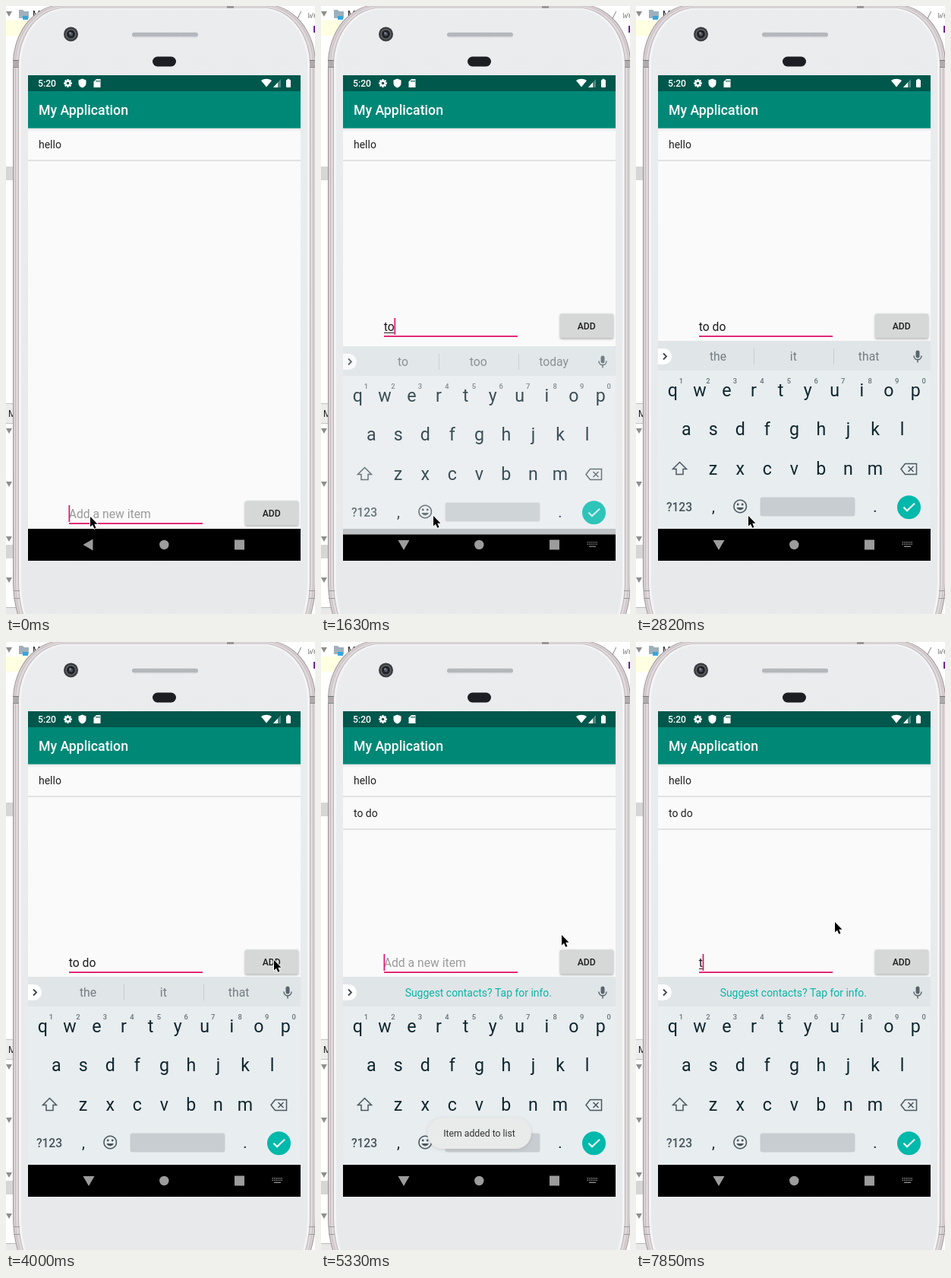
Recreate the animation shown at these times as an HTML page with a canvas. Size 407 by 799 pixels, loop 8000 ms.

```html
<!DOCTYPE html>
<html lang="en">
<head>
<meta charset="utf-8">
<title>To-do list app</title>
<style>
html, body { margin: 0; width: 100%; height: 100%; overflow: hidden; background: #fff; }
canvas { display: block; }
</style>
</head>
<body>
<canvas id="stage" width="407" height="799"></canvas>
<script>
const ctx = document.getElementById('stage').getContext('2d');
const LOOP = 8000, STEPS = 54;
const PINK = '#e0156b', KEY = '#10262e', ICON = '#58656b', TEAL = '#00b9aa';

// [step, x, y]: the pointer holds each place until the next step
const POINTER = [
  [0, 111, 671], [4, 117, 671], [5, 138, 670], [6, 148, 670],
  [23, 162, 653], [24, 215, 580], [25, 290, 490], [26, 345, 430], [27, 353, 418],
  [31, 349, 414], [32, 335, 403], [33, 324, 395], [35, 320, 389], [36, 317, 385],
  [38, 300, 364], [39, 235, 402], [40, 191, 451],
  [45, 200, 425], [46, 222, 375], [47, 238, 345], [48, 252, 356], [49, 262, 368]
];
const BLINKS = [1, 4, 8, 11, 19, 22, 26, 29, 32, 35, 39, 42, 45, 49, 52, 53];
const TYPED = [[0, ''], [11, 'to'], [13, 'to '], [15, 'to do'], [16, 'to do '], [29, ''], [53, 't']];
const HINTS = [
  [0, 'to too today'], [13, 'the be do'], [15, "do don't download"], [16, 'the it that'], [30, '']
];
const TOAST = [[0, 0], [30, .25], [31, .65], [32, 1], [42, .95], [43, .8], [44, .5], [45, .2], [46, 0]];
const BUTTON = [[0, '#d6d7d7'], [28, '#c9caca'], [29, '#c2c3c3'], [30, '#cccdcd'], [31, '#d6d7d7']];

const at = (list, n) => list.filter(e => e[0] <= n).pop();

function rect(x, y, w, h, color) {
  ctx.fillStyle = color;
  ctx.fillRect(x, y, w, h);
}
function pill(x, y, w, h, r, color) {
  ctx.fillStyle = color;
  ctx.beginPath();
  ctx.roundRect(x, y, w, h, r);
  ctx.fill();
}
function disc(x, y, r, color) {
  ctx.fillStyle = color;
  ctx.beginPath();
  ctx.arc(x, y, r, 0, 7);
  ctx.fill();
}
function fillPath(d, x, y, color) {
  ctx.save();
  ctx.translate(x, y);
  ctx.fillStyle = color;
  ctx.fill(new Path2D(d));
  ctx.restore();
}
function line(d, x, y, color, width) {
  ctx.save();
  ctx.translate(x, y);
  ctx.strokeStyle = color;
  ctx.lineWidth = width;
  ctx.stroke(new Path2D(d));
  ctx.restore();
}
function text(s, x, y, size, color, align = 'left', weight = 400) {
  ctx.font = `${weight} ${size}px Roboto, sans-serif`;
  ctx.textAlign = align;
  ctx.fillStyle = color;
  ctx.fillText(s, x, y);
}

function desktop() {
  rect(0, 0, 407, 799, '#fff');
  rect(0, 19, 34, 20, '#ffffe1');
  rect(0, 211, 9, 18, '#d6d6d6');
  rect(0, 523, 9, 25, '#ececec');
  rect(0, 522, 9, 1, '#c4c4c4');
  rect(0, 548, 9, 1, '#c4c4c4');
  rect(0, 708, 9, 18, '#d6d6d6');
  rect(0, 790, 20, 9, '#e8e8e8');
  rect(0, 790, 20, 1, '#bbb');
  for (const y of [10, 558, 628, 700, 754]) fillPath('M-4-3H4L0 4Z', 4, y, '#8e8e8e');
  fillPath('M0 0H5L7 2H13V11H0Z', 17, 5, '#9fb0bd');
  rect(22, 13, 7, 5, '#35a7dc');
  text('M', 35, 15, 12, '#222');
  text('M', 3, 540, 12, '#222');
  ctx.font = 'italic 12px "DejaVu Sans Mono", monospace';
  ctx.fillStyle = '#8c8c8c';
  ctx.fillText('/ we', 383, 16);
  rect(405, 26, 2, 9, '#6a2a90');
}

// The metal rim is thinner along the top than at the sides
function shell(inset, color) {
  const l = 9 + inset, r = 408 - inset, top = inset * .6 - 2;
  const rx = 65 - inset * .5, ry = 78 - inset * .5;
  const p = new Path2D(`M${l} ${top + ry}A${rx} ${ry} 0 0 1 ${l + rx} ${top}` +
    `H${r - rx}A${rx} ${ry} 0 0 1 ${r} ${top + ry}` +
    `V755C${r} 780 ${r - 5} 800 ${r - 12} 815H${l + 12}C${l + 5} 800 ${l} 780 ${l} 755Z`);
  ctx.fillStyle = color;
  ctx.fill(p);
}

function phone() {
  shell(0, '#9c9496');
  shell(1, '#d9d1d4');
  shell(3, '#c5bdc0');
  shell(4, '#e0d9db');
  shell(7, '#b9b3b6');
  shell(8, '#f4f4f5');
  const g = ctx.createLinearGradient(0, 0, 0, 799);
  g.addColorStop(0, '#ebecee');
  g.addColorStop(1, '#e8e9eb');
  shell(11, g);
  for (const x of [9, 400]) {
    rect(x, 71, 8, 10, '#b1abad');
    rect(x, 71, 8, 1, '#777');
    rect(x, 80, 8, 1, '#888');
    rect(x + (x < 99 ? 1 : -1), 768, 8, 1, '#999');
    rect(x + (x < 99 ? 1 : -1), 778, 8, 1, '#999');
  }
  rect(291, 0, 9, 3, '#9a9698');

  disc(85.5, 37, 9.5, '#3b3c40');
  disc(85.5, 37, 7, '#64666b');
  disc(85.5, 37, 5.5, '#1f2125');
  disc(85.5, 37, 2.5, '#4d5460');
  disc(84.5, 35.5, 1.2, '#8d949c');
  pill(166, 34.5, 87, 7, 3.5, '#d5d7da');
  pill(166, 35, 87, 5, 2.5, '#b4b7bb');
  pill(193, 66.5, 31, 13, 6.5, '#1d1e23');
}

function statusBar() {
  rect(29, 91, 359, 21, '#00574b');
  text('5:20', 42, 106, 12.2, '#fff', 'left', 500);
  for (let i = 0; i < 8; i++) {
    ctx.save();
    ctx.translate(81.5, 101.5);
    ctx.rotate(i * Math.PI / 4);
    rect(-1.2, -5.4, 2.4, 3, '#fff');
    ctx.restore();
  }
  disc(81.5, 101.5, 4, '#fff');
  disc(81.5, 101.5, 1.8, '#00574b');
  fillPath('M0-6L5-4V0C5 3 3 5 0 6C-3 5-5 3-5 0V-4Z', 100.5, 101.5, '#fff');
  fillPath('M-1-5.5H4.5V5.5H-4.5V-2Z', 120, 101.5, '#fff');
  for (const x of [-1, 1, 3]) rect(120 + x - .5, 97.5, 1, 2.5, '#00574b');
  fillPath('M0 5L-7-3.5C-3-6.5 3-6.5 7-3.5Z', 343, 101.5, '#fff');
  fillPath('M5-5.5V5.5H-5Z', 357, 101.5, '#4d8981');
  fillPath('M1-1V5.5H-5Z', 357, 101.5, '#fff');
  pill(369, 97, 6, 10, 1, '#fff');
  rect(370.5, 95.8, 3, 2, '#fff');
}

function listRow(label, y) {
  text(label, 43, y + 26, 13.98, '#212121');
  rect(29, y + 41, 359, 2, '#e2e2e2');
}

function app(n) {
  rect(29, 160, 359, 527, '#fafafa');
  const g = ctx.createLinearGradient(0, 160, 0, 165);
  g.addColorStop(0, '#dfe2e2');
  g.addColorStop(1, '#fafafa');
  rect(29, 160, 359, 5, g);
  rect(29, 112, 359, 48.6, '#008876');
  text('My Application', 43, 143, 17.7, '#fff', 'left', 500);
  listRow('hello', 161);
  if (n >= 29) listRow('to do', 204);
}

function inputRow(n) {
  ctx.save();
  if (n >= 11) ctx.translate(0, -246);
  const value = at(TYPED, n)[1];
  text(value || 'Add a new item', 82.7, 673, 15.72, value ? '#1c1c1c' : '#9a9a9a');
  const end = 82.7 + (value ? ctx.measureText(value).width : 0);
  if (value === 'to do') rect(end - 18, 675, 18, 1, '#222');
  else if (value === 'to' || value === 't') rect(83, 675, end - 83, 1, '#222');
  rect(83, 679.2, 176, 1.8, PINK);
  if (BLINKS.filter(b => b <= n).length % 2 === 0) rect(end - .2, 656, 1.7, 22, PINK);

  ctx.shadowColor = 'rgba(0,0,0,.35)';
  ctx.shadowBlur = 3;
  ctx.shadowOffsetY = 1;
  pill(315, 650.5, 70, 32, 2, at(BUTTON, n)[1]);
  ctx.shadowColor = 'transparent';
  text('ADD', 349.7, 671, 12.23, '#1f1f1f', 'center', 500);
  ctx.restore();
}

function keyRow(keys, x0, y) {
  [...keys].forEach((k, i) => text(k, x0 + i * 35.55, y, 23.2, KEY, 'center'));
}

function keyboard(n) {
  ctx.save();
  if (n === 11) {
    ctx.translate(0, 7);
    ctx.globalAlpha = .8;
  }
  rect(29, 440, 359, 247, '#e8edf0');
  rect(29, 440, 359, 39, '#e0e5e8');
  pill(29, 450, 18, 21, [0, 10.5, 10.5, 0], '#fff');
  line('M-2-4L2 0L-2 4', 38, 460.5, '#3c474c', 1.8);

  const words = at(HINTS, n)[1];
  if (words) {
    words.split(' ').forEach((w, i) => text(w, 108 + i * 99.3, 466, 15.72, '#747c80', 'center'));
    rect(155, 450, 1, 21, '#c6ccd0');
    rect(260, 450, 1, 21, '#c6ccd0');
  } else {
    text('Suggest contacts? Tap for info.', 207.3, 465.5, 13.94, '#08b5a4', 'center');
  }
  pill(368.5, 452.5, 5, 10, 2.5, ICON);
  line('M-5-1C-5 6 5 6 5-1M0 4V8', 371, 460.5, ICON, 1.5);

  keyRow('qwertyuiop', 48.4, 512.5);
  keyRow('asdfghjkl', 66.2, 564);
  keyRow('zxcvbnm', 101.6, 615.5);
  [...'1234567890'].forEach((d, i) => text(d, 59.3 + i * 35.55, 495.5, 9.4, '#667278', 'center', 500));

  line('M0-8.5L9 .5H4.5V7.5H-4.5V.5H-9Z', 57.5, 608, '#4a575d', 1.5);
  line('M-10 0L-4.5-7H10.5V7H-4.5ZM-.5-3.5L6.5 3.5M6.5-3.5L-.5 3.5', 359, 608.5, '#4a575d', 1.5);

  text('?123', 57, 663.5, 15.6, '#47555b', 'center', 500);
  text(',', 102, 665, 20, KEY, 'center');
  text('.', 315, 665, 20, KEY, 'center');
  line('M8.2 0A8.2 8.2 0 1 1 8.2-.01', 137.2, 657.5, '#4a575d', 1.6);
  fillPath('M-4.7 1.6H4.7C3.3 6-3.3 6-4.7 1.6Z', 137.2, 657.5, '#4a575d');
  disc(134.2, 655, 1.4, '#4a575d');
  disc(140.2, 655, 1.4, '#4a575d');
  pill(163.5, 645.5, 125, 25, 3, '#c8cdd1');
  disc(359.5, 658.8, 15.5, TEAL);
  line('M-7 0L-2.5 4.5L7.5-5', 359.5, 658.8, '#fff', 2);
  ctx.restore();
}

function navBar(n) {
  const open = n >= 11, gray = '#9c9c9c';
  rect(29, 687, 359, 42, '#000');
  if (n === 11) rect(29, 687, 359, 7.5, '#c0c4c6');
  fillPath(open ? 'M-7.5-6H7.5L0 7Z' : 'M-7.5 0L5.5-7.5V7.5Z', 109, 708, gray);
  disc(208.3, 708, 6.2, gray);
  rect(301, 701.5, 13, 13, gray);
  if (!open) return;
  const dim = n === 11 ? '#777' : '#8a8a8a';
  for (let i = 0; i < 6; i++)
    for (let j = 0; j < 2; j++) rect(350.5 + i * 2.4, 704 + j * 2.6, 1.4, 1.4, dim);
  rect(353, 709.6, 9, 1.4, dim);
}

function toast(n) {
  const a = at(TOAST, n)[1];
  if (!a) return;
  ctx.save();
  ctx.globalAlpha = a;
  ctx.shadowColor = 'rgba(0,0,0,.12)';
  ctx.shadowBlur = 4;
  ctx.shadowOffsetY = 1;
  pill(140, 625, 137, 41, 20.5, '#e9eaea');
  ctx.shadowColor = 'transparent';
  text('Item added to list', 208.5, 650, 12.25, '#333', 'center');
  ctx.restore();
}

function pointer(n) {
  const [, x, y] = at(POINTER, n);
  const d = 'M0 0V13.5L3 10.7L5.3 15.8L7.5 14.9L5.3 9.8H9.5Z';
  ctx.lineJoin = 'round';
  line(d, x, y, '#fff', 1.8);
  fillPath(d, x, y, '#000');
  ctx.lineJoin = 'miter';
}

function frame(now) {
  const n = Math.min(STEPS - 1, Math.floor((now % LOOP + 10) * STEPS / LOOP));
  desktop();
  phone();
  statusBar();
  app(n);
  inputRow(n);
  if (n >= 11) keyboard(n);
  navBar(n);
  toast(n);
  pointer(n);
}

let start;
function tick(now) {
  start ??= now;
  frame(now - start);
  requestAnimationFrame(tick);
}
frame(0);
requestAnimationFrame(tick);
</script>
</body>
</html>
```
